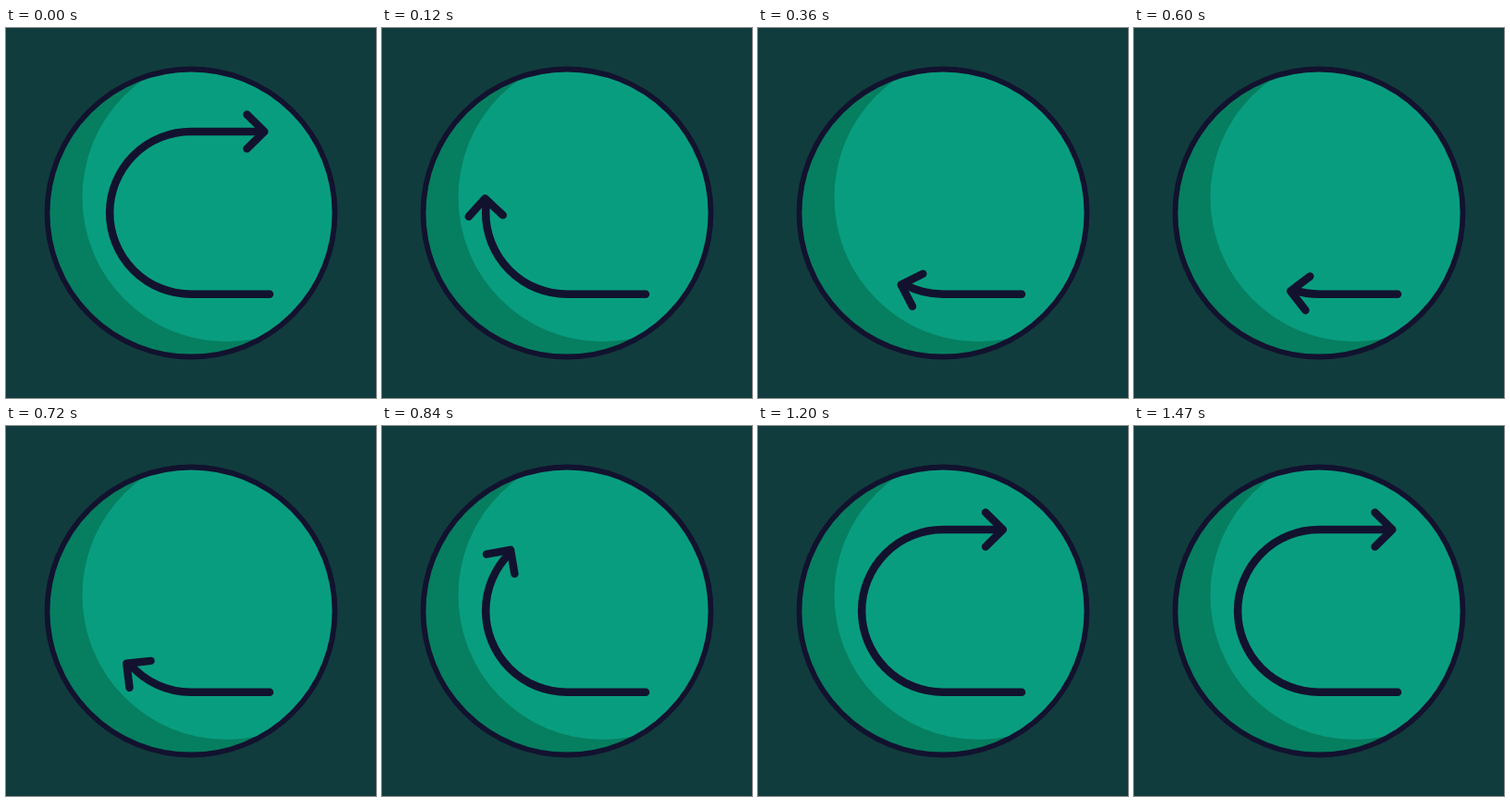
Recreate the animation shown at these times as an HTML page. Size 400x400 px, loop 3830 ms.

```html
<!DOCTYPE html>
<html lang="en">
<head>
<meta charset="utf-8">
<title>Redo arrow</title>
<style>
  html, body { margin: 0; width: 100%; height: 100%; overflow: hidden; background: #113c3d; }
  svg { display: block; width: 100%; height: 100%; }
  .ink { fill: none; stroke: #12122f; stroke-width: 8.5; stroke-linecap: round; stroke-linejoin: round; }
</style>
</head>
<body>
<svg viewBox="0 0 400 400">
  <defs>
    <clipPath id="disc"><circle cx="200" cy="200" r="155.5"/></clipPath>
  </defs>
  <g clip-path="url(#disc)">
    <rect width="400" height="400" fill="#057f60"/>
    <circle cx="238.5" cy="183" r="156" fill="#099d7f"/>
  </g>
  <circle class="ink" cx="200" cy="200" r="155.5" style="stroke-width:5.8"/>
  <path id="shaft" class="ink" d="M285 287.7H200A87.85 87.85 0 0 1 200 112H300"/>
  <path id="head" class="ink" d="M.5-18.5L19.3 0L.5 18.5"/>
</svg>
<script>
  const LOOP = 3830, STEP = 30, LAST = 49;
  const LINE = 85, R = 87.85, ARC = Math.PI * R;
  const REST = LINE + ARC + 60, LOW = 94;
  const shaft = document.getElementById('shaft');
  const head = document.getElementById('head');

  // [step, distance] turning points after the pull-back
  const keys = [[20.7, 95.5], [34.2, REST - 3], [39, REST - 16.5], [44, REST + 3], [LAST, REST]];

  function distance(n) {
    if (n <= keys[0][0]) return LOW + (REST - LOW) * Math.exp(-0.24 * n);
    const i = keys.findIndex(k => n <= k[0]);
    const [n0, a] = keys[i - 1], [n1, b] = keys[i];
    const x = (n - n0) / (n1 - n0);
    return a + (b - a) * x * x * (3 - 2 * x);
  }

  // Position and heading on the U-shaped track
  function place(s) {
    if (s < LINE) return [285 - s, 287.7, 180];
    if (s > LINE + ARC) return [200 + s - LINE - ARC, 112, 360];
    const q = (s - LINE) / R;
    return [200 - R * Math.sin(q), 199.85 + R * Math.cos(q), 180 + q * 180 / Math.PI];
  }

  function draw(now) {
    const n = Math.min(LAST, Math.floor((now % LOOP) / STEP));
    const s = distance(n);
    const [x, y, turn] = place(s);
    head.setAttribute('transform', `translate(${x} ${y}) rotate(${turn})`);
    shaft.setAttribute('stroke-dasharray', `${s + 16} 999`);
  }

  const start = performance.now();
  function tick() {
    draw(performance.now() - start);
    requestAnimationFrame(tick);
  }
  tick();
</script>
</body>
</html>
```
